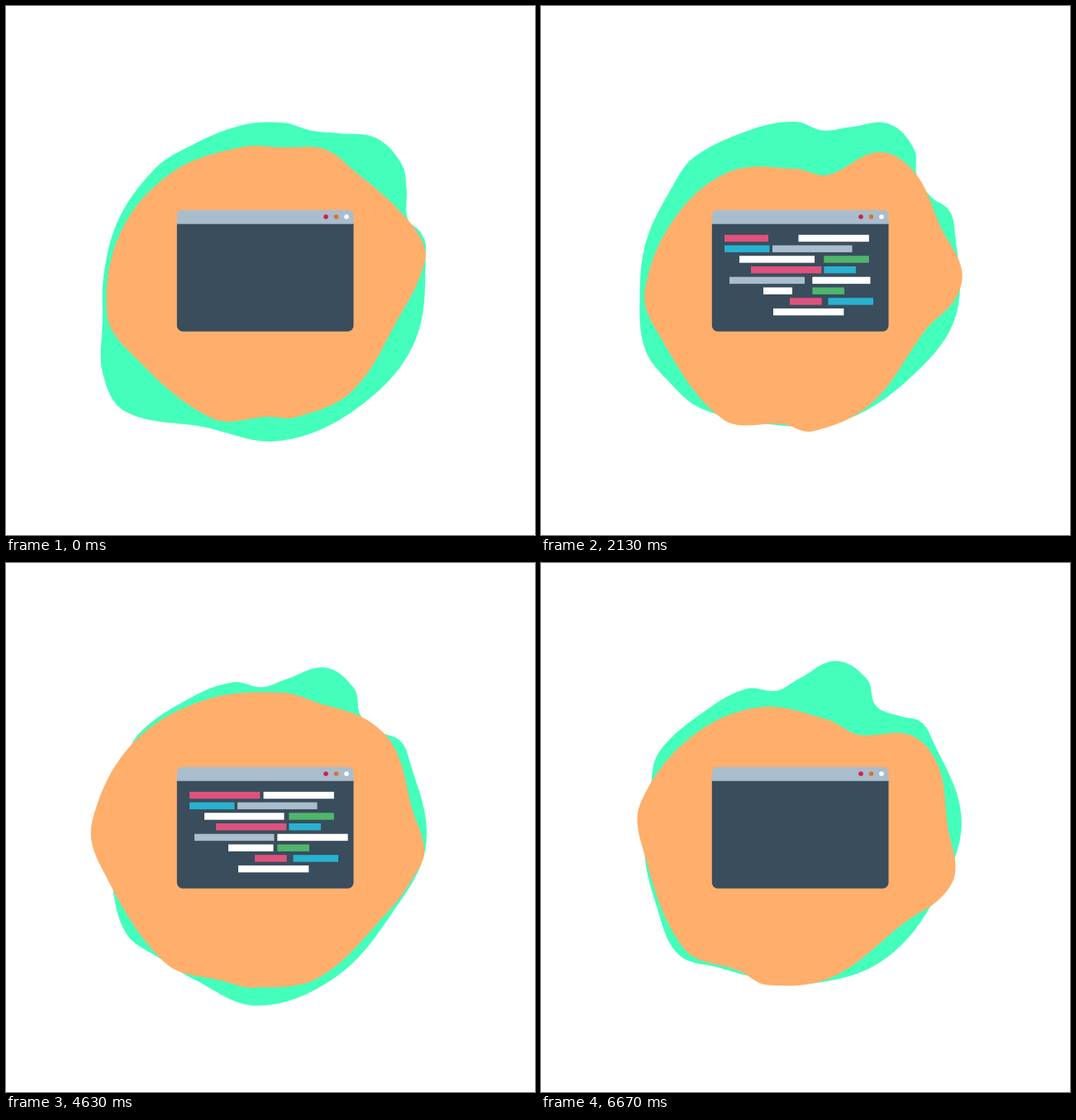
An HTML page with a canvas that plays this animation: 640 by 640 pixels, repeating every 6.71 s.

```html
<!DOCTYPE html>
<html lang="en">
<head>
<meta charset="utf-8">
<title>Code window on drifting blobs</title>
<style>
html, body { margin: 0; height: 100%; overflow: hidden; background: #fff; }
canvas { display: block; }
</style>
</head>
<body>
<canvas id="stage" width="640" height="640"></canvas>
<script>
const ctx = document.getElementById('stage').getContext('2d');
const LOOP = 6710, END = 6670, CX = 314, CY = 320;

// A blob turns steadily (degrees per second) while all its points swing on one wave.
// points: [angle, radius, swing]; wave: [time, strength]
// swells: passing bulges, [time, half duration, angle, spread, amount]
const blobs = [
  {
    color: '#43ffbb', spin: 4.2,
    points: [
      [8, 193, 3], [14, 193, 0], [20, 181, 2], [30, 173, 24], [38, 197, 12],
      [50, 206, 3], [62, 181, 7], [72, 168, 10], [83, 180, 0], [100, 182, -4],
      [124, 194, -17], [138, 187, -5], [160, 191, -3], [180, 198, -3], [198, 213, -6],
      [212, 196, 35], [225, 189, 48], [248, 189, 4], [275, 189, 0], [305, 184, 4], [335, 195, 2]
    ],
    wave: [[0, 1], [830, 0], [2130, 0.35], [2830, 0.7], [3880, 0.4], [5330, 0], [END, 0]],
    swells: [[0, 830, 278, 42, 18], [4620, 600, 254, 22, 28]]
  },
  {
    color: '#ffae6b', spin: -3.6,
    points: [
      [8, 194, 1], [24, 179, -1], [48, 184, -2], [64, 181, -9], [82, 182, -62],
      [100, 181, -58], [133, 181, -34], [165, 201, -36], [195, 218, -28], [210, 211, -22],
      [250, 204, -1], [271, 195, -8], [282, 194, 1], [306, 197, -15], [343, 185, -17], [357, 187, 3]
    ],
    wave: [[0, 0.5], [830, 0], [1400, 0], [2130, 1], [2830, 0.85], [3550, 0], [4250, 0], [5330, 1], [END, 0.8]],
    swells: [[0, 830, 52, 16, -23], [0, 830, 265, 70, -14]]
  }
];

const PINK = '#df527d', WHITE = '#fff', BLUE = '#29b2d0', GREY = '#a9bdcc', GREEN = '#4fb66c';
const S = 38.6, M = 54.5, L = 85.3, XL = 96.5, GROW = 600;
// row, x, width, color, then the start and stop times of bars that break the even stagger
const bars = [
  [0, 222, L, PINK, 1900], [0, 311.5, L, WHITE],
  [1, 222, M, BLUE, , 4976], [1, 280, XL, GREY, , 5140],
  [2, 240, XL, WHITE, 1674], [2, 342.3, M, GREEN],
  [3, 254, L, PINK, , 5039], [3, 342.3, S, BLUE],
  [4, 228, XL, GREY, 1674], [4, 328.3, L, WHITE, 1784],
  [5, 269, M, WHITE, 1890], [5, 328.3, S, GREEN],
  [6, 301, S, PINK], [6, 347.5, M, BLUE, , 5216],
  [7, 281, L, WHITE, , 5240]
];

const clamp = v => Math.max(0, Math.min(1, v));
const smooth = p => p * p * (3 - 2 * p);

function strength(wave, t) {
  const next = Math.max(1, wave.findIndex(([time]) => time >= t));
  const [t0, v0] = wave[next - 1], [t1, v1] = wave[next];
  return v0 + (v1 - v0) * smooth((t - t0) / (t1 - t0));
}

function outline({ points, wave, swells, spin }, t) {
  const level = strength(wave, t);
  return points.map(([angle, radius, swing]) => {
    let r = radius + swing * level;
    for (const [time, half, center, spread, amount] of swells) {
      const pulse = Math.cos(clamp(Math.abs(t - time) / half) * Math.PI / 2) ** 2;
      r += amount * pulse * Math.exp(-(((angle - center) / spread) ** 2));
    }
    const a = (angle + spin * t / 1000) * Math.PI / 180;
    return [CX + r * Math.cos(a), CY - r * Math.sin(a)];
  });
}

function drawBlob(blob, t) {
  const pts = outline(blob, t), n = pts.length;
  const at = i => pts[(i + n) % n];
  const tangent = i => {
    const [ax, ay] = at(i - 1), [bx, by] = at(i + 1);
    const d = Math.hypot(bx - ax, by - ay);
    return [(bx - ax) / d, (by - ay) / d];
  };
  ctx.beginPath();
  ctx.moveTo(...pts[0]);
  for (let i = 0; i < n; i++) {
    const [x0, y0] = at(i), [x1, y1] = at(i + 1);
    const [ux, uy] = tangent(i), [vx, vy] = tangent(i + 1);
    const h = Math.hypot(x1 - x0, y1 - y0) * 0.35;
    ctx.bezierCurveTo(x0 + ux * h, y0 + uy * h, x1 - vx * h, y1 - vy * h, x1, y1);
  }
  ctx.fillStyle = blob.color;
  ctx.fill();
}

function drawPanel(color, y, h, radii) {
  ctx.fillStyle = color;
  ctx.beginPath();
  ctx.roundRect(206.8, y, 213.7, h, radii);
  ctx.fill();
}

function drawWindow(t) {
  drawPanel('#394d5c', 263, 130.8, [0, 0, 7, 7]);
  drawPanel(GREY, 246.8, 17, [7, 7, 0, 0]);
  ['#d31d4d', '#d9732f', WHITE].forEach((color, i) => {
    ctx.fillStyle = color;
    ctx.beginPath();
    ctx.arc(387 + i * 12.5, 255, 2.8, 0, Math.PI * 2);
    ctx.fill();
  });
  bars.forEach(([row, x, width, color, start, stop], i) => {
    const rank = i * 7 % bars.length;
    start ??= 1000 + rank * 34;
    stop ??= 5350 + rank * 34;
    const grown = 1 - (1 - clamp((t - start) / GROW)) ** 2;
    const shrunk = clamp((t - stop) / GROW) ** 2;
    ctx.fillStyle = color;
    ctx.fillRect(x, 276.8 + row * 12.73, width * grown * (1 - shrunk), 8.4);
  });
}

function draw() {
  const t = Math.min(performance.now() % LOOP, END);
  ctx.fillStyle = WHITE;
  ctx.fillRect(0, 0, 640, 640);
  blobs.forEach(blob => drawBlob(blob, t));
  drawWindow(t);
  requestAnimationFrame(draw);
}
draw();
</script>
</body>
</html>
```
